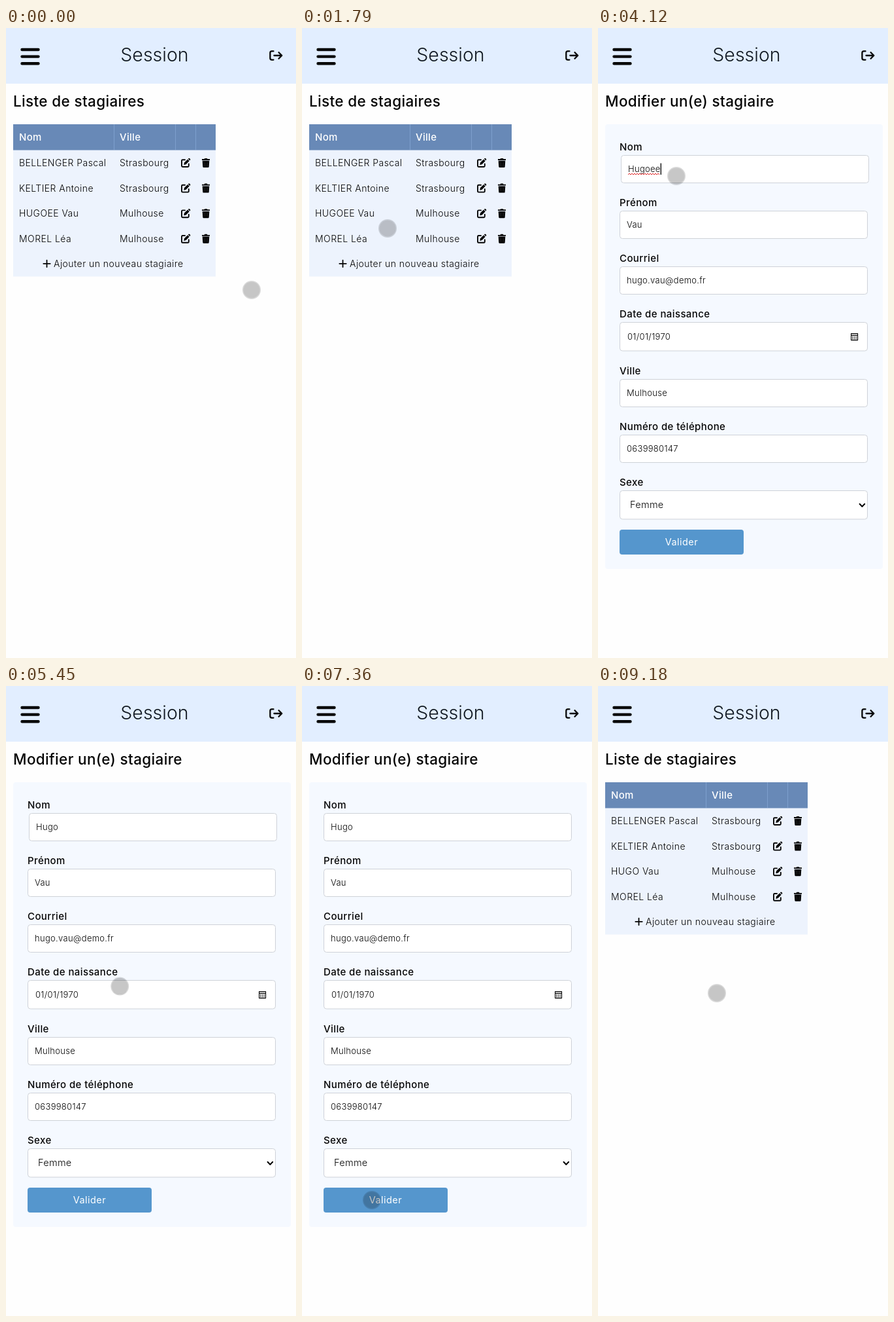
These frames come from a looping animation (444x962 px, 9.21 s). An HTML page:

```html
<!DOCTYPE html>
<html lang="fr">
<head>
<meta charset="utf-8">
<title>Session</title>
<style>
html, body { margin: 0; width: 100%; height: 100%; overflow: hidden; background: #fefefe; }
svg { display: block; width: 444px; height: 962px; }
text { font: 300 14px Inter, "Open Sans", sans-serif; letter-spacing: .45px; fill: #050505; white-space: pre; }
.brand { font-size: 28.5px; letter-spacing: 0; text-anchor: middle; fill: #101820; }
.title { font-size: 22.5px; font-weight: 500; letter-spacing: .35px; }
.label { font-size: 15px; font-weight: 500; letter-spacing: .4px; }
.input { font-size: 13px; letter-spacing: .3px; }
.select { font-size: 14.5px; }
.white { fill: #fff; }
.th { font-size: 15px; font-weight: 500; letter-spacing: .3px; }
.button { font-size: 14.5px; font-weight: 400; text-anchor: middle; }
.box { fill: #fff; stroke: #ced2d8; }
.line { fill: none; stroke: #050505; stroke-linecap: round; stroke-linejoin: round; }
</style>
</head>
<body>
<svg viewBox="0 0 444 962">
  <defs>
    <g id="edit">
      <path class="line" stroke-width="1.9" d="M-1-4.8H-4.6Q-6-4.8-6-3.4V4.6Q-6 6-4.6 6H3.4Q4.8 6 4.8 4.6V1.4"/>
      <path d="M-2.8 3.1-2-.6 3.1-5.6 5.7-3 .6 2.2ZM3.8-6.3 4.7-7Q5.5-7.5 6.3-6.8L7-6Q7.6-5.2 7-4.5L6.3-3.7Z"/>
    </g>
    <g id="trash">
      <path d="M-6-5.9H-2.5L-1.8-7H1.8L2.5-5.9H6V-4.1H-6ZM-5.3-3.2H5.3L4.7 5.8Q4.6 7 3.4 7H-3.4Q-4.6 7-4.7 5.8Z"/>
      <path d="M-2.6-1V5M0-1V5M2.6-1V5" stroke="#333" stroke-width=".7"/>
    </g>
  </defs>
  <rect width="444" height="85" fill="#e2eeff"/>
  <path class="line" stroke-width="4.4" d="M24.5 33H49.5M24.5 43.6H49.5M24.5 54.2H49.5"/>
  <text class="brand" x="227.5" y="51">Session</text>
  <path class="line" stroke-width="2.3" d="M409.5 35.4H407Q404.4 35.4 404.4 38V46Q404.4 48.6 407 48.6H409.5M410.5 42H422M417.6 37.2 422.3 42 417.6 46.8"/>
  <g id="list"></g>
  <g id="form"></g>
  <g id="cursor" stroke-width="2">
    <circle r="12.5" opacity=".22"/>
    <circle r="13.2" fill="none" stroke="#000" stroke-width="1.6" opacity=".15"/>
  </g>
</svg>
<script>
const LOOP = 9210, OPEN = 3350, SAVED = 7600, FOCUS = 3850, BLUR = 6200, HOVER = 2790;
const $ = id => document.getElementById(id);
const text = (cls, x, y, s, id = '') => `<text class="${cls}" x="${x}" y="${y}" id="${id}">${s}</text>`;
const rect = (x, y, w, h, attrs) => `<rect x="${x}" y="${y}" width="${w}" height="${h}" ${attrs}/>`;
const icon = (name, x, y) => `<g transform="translate(${x} ${y})"><use href="#${name}"/></g>`;

// List page
const people = [
  ['BELLENGER Pascal', 'Strasbourg'], ['KELTIER Antoine', 'Strasbourg'],
  ['HUGOEE Vau', 'Mulhouse'], ['MOREL Léa', 'Mulhouse']
];
const row = ([name, city], i) => {
  const y = 206 + i * 38.6;
  return `<g id="row${i}">` + text('', 20, y + 5, name, 'name' + i) + text('', 174, y + 5, city)
    + `<g id="edit${i}">${icon('edit', 275, y)}</g>` + icon('trash', 306, y) + '</g>';
};
$('list').innerHTML = text('title', 11, 120, 'Liste de stagiaires')
  + rect(11, 147, 310, 232.5, 'fill="#edf3fd"')
  + rect(11, 147, 310, 39.5, 'fill="#6889b7"')
  + '<path d="M165.5 147V186M259.5 147V186M290.5 147V186" stroke="#7d9fcd"/>'
  + text('th white', 20, 172, 'Nom') + text('th white', 174, 172, 'Ville')
  + rect(11, 264, 310, 38.5, 'id="hover" fill="#ced9e7"')
  + people.map(row).join('')
  + '<path class="line" stroke-width="1.8" d="M57.3 359.8H67.7M62.5 354.6V365"/>'
  + text('', 73, 365, 'Ajouter un nouveau stagiaire');

// Form page
const field = (label, y, h, value, x = 44, cls = 'input') => text('label', 33, y - 7, label)
  + rect(33.5, y + .5, 379, h, 'rx="4" class="box"') + text(cls, x, y + h / 2 + 5, value);
$('form').innerHTML = text('title', 11, 120, 'Modifier un(e) stagiaire')
  + rect(11, 147, 425, 679, 'rx="4" fill="#f5f9ff"')
  + text('label', 33, 187, 'Nom')
  + '<g id="nameField">' + rect(33.5, 194.5, 379, 42, 'rx="4" class="box"')
  + text('input', 44, 220, '', 'nameText')
  + '<path id="squiggle" fill="none" stroke="#d22" stroke-width="1"/>'
  + rect(0, 206.5, 1.3, 17.5, 'id="caret"') + '</g>'
  + field('Prénom', 279, 42, 'Vau')
  + field('Courriel', 364, 42, 'hugo.vau@demo.fr')
  + field('Date de naissance', 449, 43.5, '01/01/1970', 45)
  + field('Ville', 536, 42, 'Mulhouse')
  + field('Numéro de téléphone', 621, 42, '0639980147')
  + field('Sexe', 706, 43.5, 'Femme', 49, 'input select')
  + '<path class="line" stroke-width="1.1" d="M387.6 466.6H397.6V476.6H387.6ZM387.6 469.4H397.6"/>'
  + '<path stroke="#222" stroke-width="1.4" stroke-dasharray="1.6 1.2" d="M389 472H396.5M389 474.5H396.5"/>'
  + '<path class="line" stroke-width="2" d="M400.6 726.8 404.4 730.8 408.2 726.8"/>'
  + rect(33, 766, 190, 38, 'rx="4" fill="#5596cd"')
  + text('button white', 128, 790, 'Valider');

// Pointer stops: time, x, y
const stops = [
  [0, 376, 400], [250, 374, 396], [940, 277, 215], [1080, 270, 193], [1400, 60, 290], [1550, 80, 340],
  [1790, 131, 306], [2050, 72, 351], [2150, 80, 350], [2640, 274.5, 283], [3650, 274.5, 283],
  [3830, 120, 226], [5050, 120, 226], [5580, 192, 535], [6450, 256, 812], [6580, 258, 818],
  [6750, 258, 820], [7250, 107, 785], [7620, 107, 785], [7930, 107, 400], [8400, 107, 400],
  [9100, 182, 469], [9210, 182, 469]
];
const slope = (i, k) => (stops[i + 1][k] - stops[i][k]) / (stops[i + 1][0] - stops[i][0]);
// Harmonic tangents keep the path smooth and stop it overshooting
const tangent = (i, k) => {
  if (i < 1 || i > stops.length - 2) return 0;
  const a = slope(i - 1, k), b = slope(i, k);
  return a * b > 0 ? 2 * a * b / (a + b) : 0;
};
function pointer(t, k) {
  const i = stops.findIndex((s, n) => n + 1 === stops.length - 1 || t < stops[n + 1][0]);
  const p = stops[i], q = stops[i + 1], d = q[0] - p[0], u = (t - p[0]) / d, v = 1 - u;
  return p[k] * v * v * (1 + 2 * u) + q[k] * u * u * (3 - 2 * u)
    + d * u * v * (v * tangent(i, k) - u * tangent(i + 1, k));
}
const ramp = (t, start, length) => {
  const u = Math.min(1, Math.max(0, (t - start) / length));
  return u * u * (3 - 2 * u);
};
const show = (id, on) => $(id).style.display = on ? '' : 'none';

function draw(now) {
  const t = now % LOOP, inForm = t >= OPEN && t < SAVED;
  show('list', !inForm);
  show('form', inForm);
  $('cursor').setAttribute('transform', `translate(${pointer(t, 1)} ${pointer(t, 2)})`);

  if (inForm) {
    const name = 'Hugoee'.slice(0, t < 4700 ? 6 : t < 4850 ? 5 : 4);
    const focused = t >= FOCUS && t < BLUR;
    $('nameText').textContent = name;
    const end = 44 + $('nameText').getComputedTextLength();
    const shift = 2 * (ramp(t, FOCUS, 200) - ramp(t, BLUR, 200));
    $('nameField').setAttribute('transform', `translate(${shift} 0)`);
    $('caret').setAttribute('x', end);
    show('caret', focused && (t < 4850 ? (t - FOCUS) % 1000 < 500 : (t - 4850) % 1000 < 500));
    show('squiggle', focused && name.length > 4);
    let wave = 'M44 224';
    for (let x = 46, up = true; x < end; x += 2, up = !up) wave += `L${x} ${up ? 222 : 224}`;
    $('squiggle').setAttribute('d', wave);
  } else {
    const h = t < OPEN ? ramp(t, HOVER, 200) : 0;
    $('name2').textContent = t < OPEN ? 'HUGOEE Vau' : 'HUGO Vau';
    $('hover').style.opacity = h;
    $('row2').style.opacity = 1 - .3 * h;
    const s = 1 + .2 * h;
    $('edit2').setAttribute('transform', `translate(275 283.2) scale(${s}) translate(-275 -283.2)`);
  }
  requestAnimationFrame(draw);
}
const start = performance.now();
draw(0);
function tick() { return performance.now() - start; }
</script>
</body>
</html>
```
